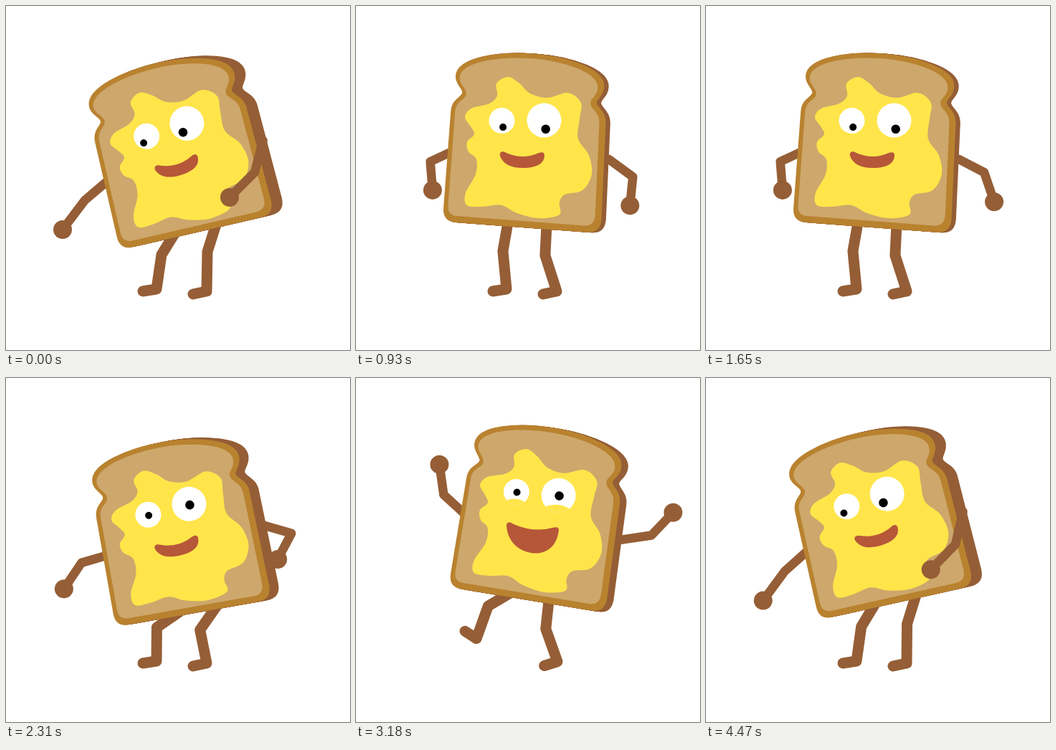
Write an HTML page with a canvas that moves like this. It is 480 by 480 pixels and loops after 4.5 s.

```html
<!DOCTYPE html>
<html lang="en">
<head>
<meta charset="utf-8">
<title>Dancing toast</title>
<style>
  html, body { margin: 0; width: 100%; height: 100%; overflow: hidden; background: #fff; }
  canvas { display: block; }
</style>
</head>
<body>
<canvas id="stage" width="480" height="480"></canvas>
<script>
const ctx = document.getElementById('stage').getContext('2d');
const LOOP = 4500;
const BROWN = '#955e36', CRUST = '#b9822f', CRUMB = '#cda76c', BUTTER = '#ffe54a', MOUTH = '#b65739';
const FACE_TILT = 4.2, RAD = Math.PI / 180;

const bread = new Path2D(`M0-125C46-125 98-112 98-90C98-78 90-76 89-68C89-58 104-56 104-38
  L108 94Q108 110 93 110L-91 110Q-105 110-105 95L-105-40C-105-58-90-58-91-68
  C-92-76-102-80-102-90C-102-112-50-125 0-125Z`);

const butter = smoothLoop([
  [212, 99], [228, 108], [243, 122], [267, 128], [296, 121], [314, 135], [312, 157], [310, 185],
  [325, 208], [329, 235], [316, 257], [291, 263], [284, 275], [284, 291], [255, 296], [225, 289],
  [203, 278], [177, 280], [155, 278], [153, 261], [167, 235], [168, 214], [157, 203], [155, 190],
  [165, 179], [160, 168], [152, 155], [161, 143], [186, 136], [197, 125], [196, 108]
]);

// Closed Catmull-Rom curve through the points
function smoothLoop(points) {
  const path = new Path2D(), n = points.length, at = i => points[(i + n) % n];
  path.moveTo(...at(0));
  for (let i = 0; i < n; i++) {
    const [a, b, c, d] = [at(i - 1), at(i), at(i + 1), at(i + 2)];
    path.bezierCurveTo(b[0] + (c[0] - a[0]) / 6, b[1] + (c[1] - a[1]) / 6,
      c[0] - (d[0] - b[0]) / 6, c[1] - (d[1] - b[1]) / 6, ...c);
  }
  path.closePath();
  return path;
}

// body: x, y, tilt, thickness; face: look x, look y, laugh
// arms: elbow, hand; legs: hip, knee, ankle, toe
const leftFoot = [210, 395, 191, 398], rightFoot = [280, 398, 261, 402];
const swayLeft = {
  body: [239.5, 205, -13, 15.5], face: [-.37, .43, 0],
  leftArm: [110, 271, 79, 312], rightArm: [347, 232, 312, 267],
  leftLeg: [235, 318, 217, 347, ...leftFoot], rightLeg: [293, 305, 281, 343, ...rightFoot]
};
const swayRight = {
  body: [237, 203, 14.3, 1], face: [.36, .55, 0],
  leftArm: [100, 186, 123, 225], rightArm: [409, 242, 423, 285],
  leftLeg: [198, 297, 198, 339, ...leftFoot], rightLeg: [250, 313, 254, 351, ...rightFoot]
};
const crouch = {
  body: [240.5, 217, -9.8, 13], face: [.05, .04, 0],
  leftArm: [105, 257, 81, 293], rightArm: [400, 217, 380, 253],
  leftLeg: [235, 332, 210, 348, ...leftFoot], rightLeg: [292, 322, 270, 352, ...rightFoot]
};
const kickLeft = {
  body: [223.5, 194.5, -11.1, 16.5], face: [.02, .02, 1.09],
  leftArm: [90, 201, 65, 154], rightArm: [377, 150, 392, 102],
  leftLeg: [222, 310, 211, 342, ...leftFoot], rightLeg: [279, 299, 280, 331, 322, 351, 315, 371]
};
const kickRight = {
  body: [256.7, 197, 10.4, 9], face: [.04, .03, 1],
  leftArm: [124, 161, 119, 119], rightArm: [414, 223, 445, 192],
  leftLeg: [209, 303, 183, 317, 166, 362, 150, 351], rightLeg: [268, 316, 264, 351, 279, 398, 260, 403]
};
const armBack = rightArm => ({ ...swayLeft, rightArm });

// time, pose, lift of the body on the way to the next pose
const keys = [
  [0, swayLeft, 9], [360, swayRight, 9], [720, swayLeft, 9], [1080, swayRight, 9],
  [1440, armBack([352, 215, 366, 253]), 9], [1800, swayRight, 9],
  [2160, armBack([372, 214, 367, 252]), 0], [2340, crouch, 0],
  [2820, kickLeft, 0], [3240, kickRight, 0], [3660, kickLeft, 0],
  [4140, swayRight, 9], [LOOP, swayLeft, 0]
];

function poseAt(time) {
  const next = keys.findIndex(key => key[0] > time);
  const [t0, from, lift] = keys[next - 1], [t1, to] = keys[next];
  const t = (time - t0) / (t1 - t0), ease = (1 - Math.cos(Math.PI * t)) / 2;
  const pose = {};
  for (const part in from) pose[part] = from[part].map((v, i) => v + (to[part][i] - v) * ease);
  pose.body[1] -= lift * Math.sin(Math.PI * t);
  return pose;
}

function dot(x, y, r, color) {
  ctx.fillStyle = color;
  ctx.beginPath();
  ctx.arc(x, y, r, 0, 7);
  ctx.fill();
}

function limb(coords, width) {
  ctx.strokeStyle = BROWN;
  ctx.lineWidth = width;
  ctx.beginPath();
  for (let i = 0; i < coords.length; i += 2) ctx.lineTo(coords[i], coords[i + 1]);
  ctx.stroke();
}

function leg([hx, hy, kx, ky, ...foot]) {
  limb([hx + (hx - kx) * .3, hy + (hy - ky) * .3, kx, ky, ...foot], 15);
}

function arm([x, y, tilt], sx, sy, joints) {
  const c = Math.cos(tilt * RAD), s = Math.sin(tilt * RAD);
  limb([x + sx * c - sy * s, y + sx * s + sy * c, ...joints], 12.5);
  dot(joints[2], joints[3], 13, BROWN);
}

function slice(color) {
  ctx.fillStyle = ctx.strokeStyle = color;
  ctx.lineWidth = 8;
  ctx.fill(bread);
  ctx.stroke(bread);
}

// The crumb sits up and to the left, so the crust is wider at the right and bottom
function crumb() {
  ctx.save();
  ctx.translate(-1.5, -1.2);
  ctx.scale(.966, .966);
  ctx.fillStyle = CRUMB;
  ctx.fill(bread);
  ctx.restore();
}

function eye(x, y, r, pupil, [lookX, lookY, laugh]) {
  ctx.save();
  dot(x, y, r, '#fff');
  ctx.clip();
  dot(x + lookX * r, y + lookY * r, pupil, '#000');
  if (laugh > 0) dot(x, y + r * (2.5 - .45 * laugh), r * 1.5, BUTTER);
  ctx.restore();
}

function mouth(laugh) {
  const l = 201 - 7 * laugh, r = 263 + 4 * laugh, bottom = 226 + 17 * laugh;
  const cheek = 209 + (bottom - 209) * .65;
  ctx.fillStyle = MOUTH;
  ctx.beginPath();
  ctx.moveTo(l, 209);
  ctx.bezierCurveTo(l - 1, 203, l + 4, 202, l + 9, 205);
  ctx.quadraticCurveTo(233, 215, r - 8, 205);
  ctx.bezierCurveTo(r - 3, 203, r + 1, 204, r, 210);
  ctx.bezierCurveTo(r - 1, cheek, 252, bottom, 234, bottom);
  ctx.bezierCurveTo(215, bottom, l + 4, cheek, l, 209);
  ctx.fill();
}

function toast([x, y, tilt, depth], face) {
  ctx.save();
  ctx.translate(x, y);
  ctx.rotate(tilt * RAD);
  for (let i = 8; i > 0; i--) {
    ctx.save();
    ctx.translate(depth * i / 8, 0);
    slice(BROWN);
    ctx.restore();
  }
  slice(CRUST);
  crumb();
  ctx.rotate(-FACE_TILT * RAD);
  ctx.translate(-238, -195);
  ctx.fillStyle = BUTTER;
  ctx.fill(butter);
  eye(203.5, 160, 18, 5, face);
  eye(262.5, 159.5, 24, 6.3, face);
  mouth(face[2]);
  ctx.restore();
}

function draw() {
  const { body, face, leftArm, rightArm, leftLeg, rightLeg } = poseAt(performance.now() % LOOP);
  ctx.fillStyle = '#fff';
  ctx.fillRect(0, 0, 480, 480);
  ctx.lineCap = ctx.lineJoin = 'round';
  leg(leftLeg);
  leg(rightLeg);
  arm(body, -98, 13, leftArm);
  toast(body, face);
  arm(body, 113 + .45 * body[3], 10, rightArm);
  requestAnimationFrame(draw);
}
draw();
</script>
</body>
</html>
```
